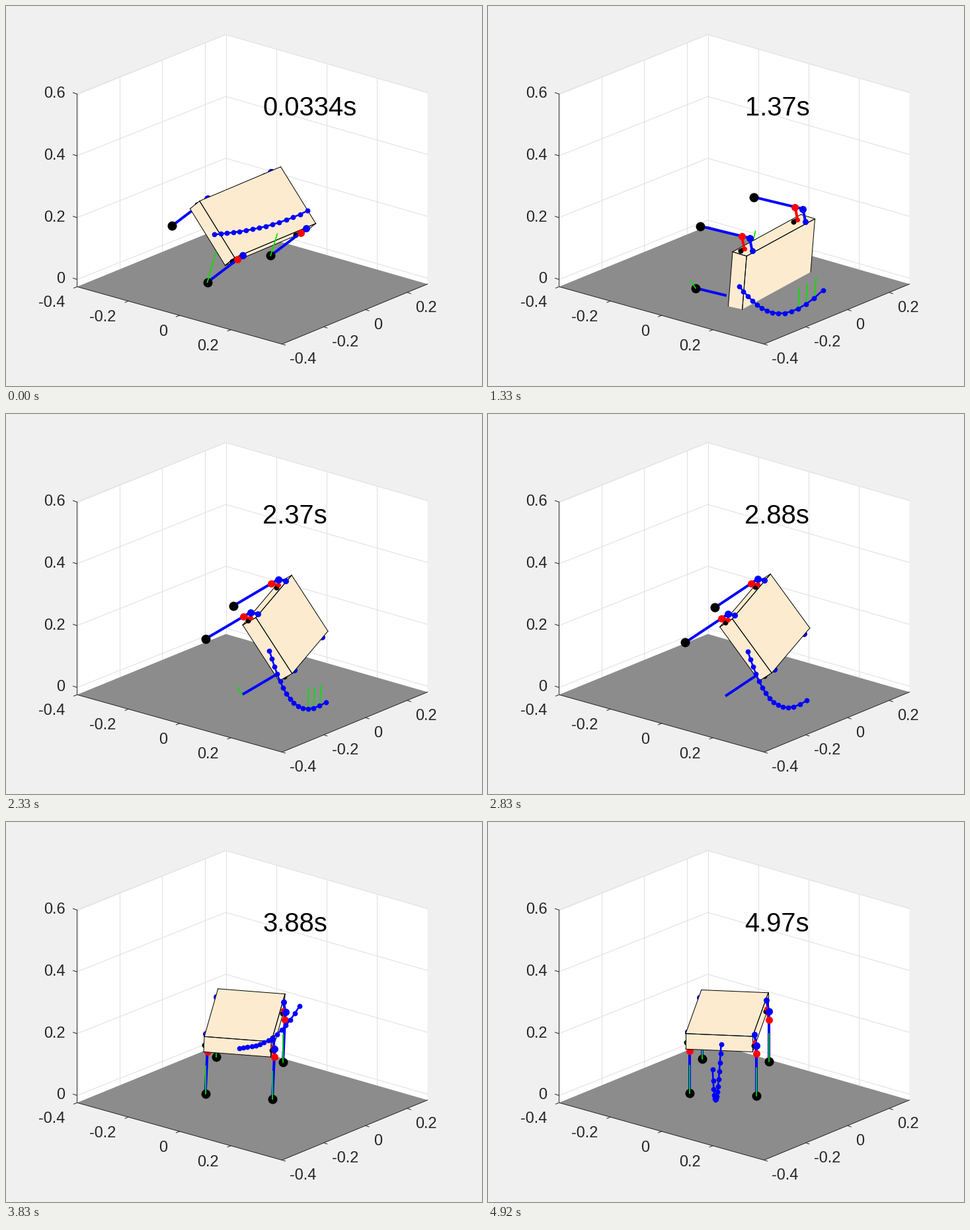
Write a matplotlib script that moves like this. It is 720x576 px and loops after 5.01 s.

```python
import numpy as np
import matplotlib.pyplot as plt
from matplotlib.animation import FuncAnimation

TICKS, INTERVAL = 167, 30
POSES, RATE = 60, 12  # the picture steps twelve times a second
INK, BLUE, RED, GREEN = "#262626", "#0000ff", "#ff0000", "#00e400"
SKIN, FLOOR, GRID = "#fdebd0", "#8c8c8c", "#dfdfdf"
SIZE = np.array([102, 195, 25])  # body width, length, thickness in pixels
LEGS = [(-1, -1), (1, -1), (-1, 1), (1, 1)]  # front left/right, back left/right
COS, SIN = np.cos(np.radians(20)), np.sin(np.radians(20))  # camera elevation

# step, hold, centre x, y, yaw, roll, tail reach x, y, tail sag
MOVES = np.array([
    [0, 0, 373, 318, 39, 48, 141, -36, 8],      # tipping over
    [6, 0, 427, 406, 36, 100, 128, 0, 35],      # on its side
    [16, 2, 428, 394, 32, 95, 127, 6, 37],
    [28, 5, 422, 324, 16, 56, 86, 78, 34],      # pushing up
    [39, 0, 371, 311, 8, 12, 131, 35, 29],      # landing on its feet
    [46, 0, 360, 304, 6, 2.5, 91, -64, 20],
    [59, 0, 361, 301, 7, 0, -13, 38, 60],       # standing
])

plt.rcParams["font.family"] = "Liberation Sans"
fig = plt.figure(figsize=(7.2, 5.76), dpi=100, facecolor="#f0f0f0")
ax = fig.add_axes([0, 0, 1, 1])
ax.set(xlim=(-.5, 719.5), ylim=(575.5, -.5))
ax.axis("off")


def line(pts, color, width, z, **kw):
    pts = np.asarray(pts, float)
    return ax.plot(pts[:, 0], pts[:, 1], color=color, lw=width * .72, zorder=z, **kw)[0]


def fill(pts, color, z):
    return ax.fill(*np.asarray(pts, float)[:, :2].T, fc=color, ec="none", zorder=z)[0]


def label(x, y, s, ha):
    ax.text(x, y + 7.5, s, size=23.5 * .72, color=INK, ha=ha, va="baseline")


def draw_axes():
    left, back, right, front = map(np.array, [(107, 425), (332, 333), (637, 421), (417, 512)])
    rise = np.array([0, 290])
    fill([left, back, right, right - rise, back - rise, left - rise], "white", 0)
    for i in range(4):
        y = 414 - 93.7 * i
        line([(107, y), (332, y - 90), (637, y - 2)], GRID, 1, 1)
        line([(107, y), (101, y - 2)], INK, 1, 3)
        label(89, y - 1.5, "%g" % (i / 5), "right")
    walls = [left + (back - left) * f for f in (.287, .573, .86, 1)]
    walls += [back + (right - back) * f for f in (.25, .5, .75)]
    for p in walls:
        line([p, p - rise], GRID, 1, 1)
    fill([left, back, right, front], FLOOR, 2)
    line([(107, 133), left, front, right], INK, 1, 3)
    for i, s in enumerate(["-0.4", "-0.2", "0", "0.2"]):
        p = left + (front - left) * i / 4
        line([p, p + (-5, 2)], INK, 1, 3)
        label(p[0] - 18.5, p[1] + 23.5, s, "right")
        p = front + (63.3 * i, -26 * i)
        line([p, p + (5, 1.5)], INK, 1, 3)
        label(p[0] + 12, p[1] + 22, s, "left")


draw_axes()
clock = ax.text(388, 165.3, "", size=28.8, color="black", va="baseline", zorder=4)
artists = []


def blend(k):
    """Ease between the moves on either side of step k."""
    i = min(np.searchsorted(MOVES[:, 0], k, side="right") - 1, len(MOVES) - 2)
    a, b = MOVES[i], MOVES[i + 1]
    start = a[0] + a[1]
    u = np.clip((k - start) / (b[0] - start), 0, 1)
    return (a + (b - a) * u * u * (3 - 2 * u))[2:]


def forces(k):
    """Ground reaction at each foot, keyed by leg."""
    if k < 4:
        return {1: (13, -46), 3: (10, -33)}
    if k < 31:
        return {1: (-7, -11), 3: (10, -42)}
    if 38 <= k <= 40:
        return {0: (62, -278), 3: (51, -122)}
    return {i: (0, -42) for i in range(4)} if k > 40 else {}


class Body:
    """Box and legs; vectors are (right, down, towards the viewer)."""

    def __init__(self, k, x, y, yaw, roll, reach_x, reach_y, sag):
        self.centre = np.array([x, y, 0])
        self.height = 97 - 66 * np.clip((roll - 50) / 50, 0, 1)
        pitch = np.radians(7.5) * np.exp(-((k - 39) / 6) ** 2)
        yaw, roll = np.radians([yaw, roll])
        up = np.array([0, -COS, SIN])
        across = np.array([np.cos(yaw), np.sin(yaw) * SIN, np.sin(yaw) * COS])
        along = np.array([np.sin(yaw), -np.cos(yaw) * SIN, -np.cos(yaw) * COS])
        w = np.cos(roll) * across - np.sin(roll) * up
        l = np.cos(pitch) * along + np.sin(pitch) * up
        l -= w * (w @ l)
        l /= np.linalg.norm(l)
        c = np.cross(l, w)
        self.axes = np.array([w, l, c])

        # Legs crouch while rolled and straighten when upright.
        crouch = np.tanh(6 * roll)
        self.knee = -23 * c + 20 * crouch * l + (3.5 - 8 * roll) * w
        self.shin = -68 * (c + .14 * crouch * l)
        self.reach = np.array([reach_x, reach_y])
        self.sag = sag * np.array([-.35 * crouch, 1])

    def at(self, *f):
        return self.centre + (np.array(f) * SIZE) @ self.axes

    def above(self, p):
        return self.height - COS * (p[1] - self.centre[1]) + SIN * p[2]

    def clip(self, p, q):
        """Part of a segment over the floor, or None."""
        a, b = self.above(p), self.above(q)
        if a <= 0 and b <= 0:
            return None
        cut = p + (q - p) * a / (a - b) if a * b < 0 else None
        return (cut if a < 0 else p), (cut if b < 0 else q)

    def rod(self, p, q, color, width, z):
        seg = self.clip(p, q)
        if seg:
            artists.append(line(seg, color, width, z, solid_capstyle="butt"))

    def dot(self, p, color, size, z):
        if self.above(p) > 0:
            artists.append(line([p], color, 0, z, marker="o", ms=size * .72, mew=0))

    def draw_box(self):
        for i in range(3):
            side = 1 if self.axes[i, 2] > 0 else -1
            corners = []
            for a, b in [(-.5, -.5), (.5, -.5), (.5, .5), (-.5, .5)]:
                f = [0, 0, 0]
                f[i], f[i - 2], f[i - 1] = side / 2, a, b
                corners.append(self.at(*f))
            edges = [self.clip(p, q) for p, q in zip(corners, corners[1:] + corners[:1])]
            edges = [e for e in edges if e]
            if edges:
                artists.append(fill([p for e in edges for p in e], SKIN, 8))
                artists.extend(line(e, "black", 1, 9) for e in edges)

    def draw_leg(self, sw, sl, push):
        z = 11 if sw * self.axes[0, 2] > 0 else 6
        w, l = sw * .5, sl * .39
        hip = self.at(w, l, -.2)
        knee = self.at(w, l, 0) + self.knee
        foot = knee + self.shin
        back = -.19 * self.shin
        self.rod(self.at(w, l - .07, -.25), self.at(w, l, -.25), "black", 5, z)
        self.dot(self.at(w, l - .05, -.25), "black", 8, z)
        self.rod(hip, knee, RED, 4, z)
        self.rod(hip + back, knee + back, BLUE, 4, z)
        self.rod(knee + back, foot, BLUE, 4, z)
        self.dot(hip, RED, 7, z)
        self.dot(hip + back, BLUE, 9, z)
        self.dot(knee + back, BLUE, 11, z)
        self.dot(knee, RED, 11, z)
        self.dot(foot, "black", 14, z)
        if push:
            artists.append(line([foot[:2], foot[:2] + push], GREEN, 1.7, z + 1))

    def draw_tail(self, prongs):
        u = np.linspace(0, 1, 15)[:, None]
        bend = 4 * u * (1 - u) * (.7 + .6 * u)
        beads = self.at(0, -.5, 0)[:2] + (3, 2) + u * self.reach + bend * self.sag
        if prongs:
            for n in (11, 12, 13):
                artists.append(line([beads[n], beads[n] + (n - 10, -31)], GREEN, 1.7, 13))
        artists.append(line(beads, BLUE, 2.6, 14, marker="o", ms=5.6, mew=0))


def draw(tick):
    for a in artists:
        a.remove()
    artists.clear()
    k = min(int((tick * INTERVAL + 25) * RATE / 1000), POSES - 1)
    body = Body(k, *blend(k))
    body.draw_box()
    push = forces(k)
    for i, (sw, sl) in enumerate(LEGS):
        body.draw_leg(sw, sl, push.get(i))
    body.draw_tail(4 <= k < 31)
    clock.set_text("%.3gs" % (.0334 + .0836 * k))
    return artists + [clock]


anim = FuncAnimation(fig, draw, frames=TICKS, interval=INTERVAL,
                     init_func=lambda: [], repeat=True, repeat_delay=0, blit=False)
plt.show()
```
